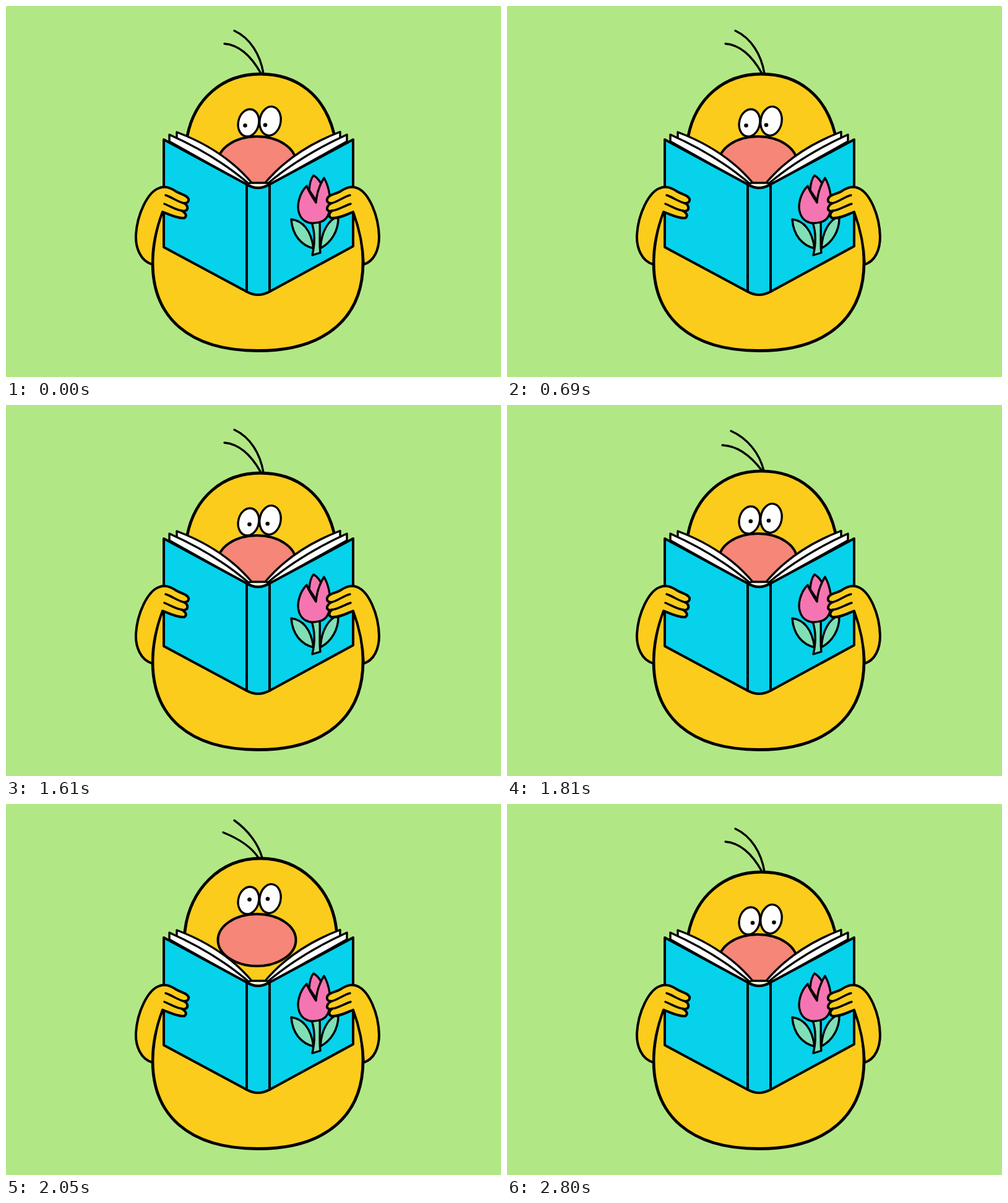
These frames come from a looping animation (800x600 px, 3000 ms). An HTML page:

```html
<!DOCTYPE html>
<html lang="en">
<head>
<meta charset="utf-8">
<title>Reading bird</title>
<style>
  html, body { margin: 0; width: 100%; height: 100%; overflow: hidden; background: #b2e786; }
  svg { display: block; width: 800px; height: 600px; }
  .ink { stroke: #000; stroke-width: 4; stroke-linecap: round; stroke-linejoin: round; fill: none; }
  .skin { fill: #fbcc1c; }
  .beak { fill: #f58678; }
  .white { fill: #fff; }
  .cream { fill: #fff9dc; }
  .cover { fill: #06d2ec; }
  .petal { fill: #f575b2; }
  .leaf { fill: #80dfb6; }
  .thin { stroke-width: 3.4; }
  .bold { stroke-width: 4.8; }
</style>
</head>
<body>
<svg viewBox="0 0 800 600">
  <g class="ink">
    <path id="hair" class="thin"/>
    <path id="body" class="skin bold"/>

    <g id="face">
      <ellipse class="beak" cx="405.5" cy="253" rx="63" ry="42"/>
      <ellipse class="white thin" cx="392" cy="189" rx="16.6" ry="22.3" transform="rotate(13 392 189)"/>
      <ellipse class="white thin" cx="427" cy="186" rx="17" ry="23.5" transform="rotate(10 427 186)"/>
    </g>
    <g fill="#000" stroke="none">
      <circle id="pupilL" r="3.3"/>
      <circle id="pupilR" r="3.3"/>
    </g>

    <g class="thin">
      <path class="white" d="M276 222V204Q353 233 398 287L389 289Z"/>
      <path class="white" d="M264 219V208Q340 242 393 288L389 289Z"/>
      <path class="white" d="M540 222V203.500Q463 233 418 287L426 289Z"/>
      <path class="white" d="M551 219V208Q476 242 422 288L426 289Z"/>
    </g>
    <path class="cover" d="M255 216L389 288.500Q407 300 426 288.500L561 216V388.500L426 462Q407 472 389 462L255 390Z"/>
    <path class="cream thin" d="M390 288.500L395 286H421L425 288.500Q407 299 390 288.500Z"/>
    <path d="M389 289V462M426 289V462"/>

    <g class="thin">
      <path class="leaf" d="M461 345C479 347 493 362 497 392C477 387 463 371 461 345Z"/>
      <path class="leaf" d="M537 340C521 346 510 364 508 392C525 383 538 364 537 340Z"/>
      <path class="leaf" d="M494 350C500 368 499 386 495 403L508 399C506 384 508 366 507 349Z"/>
      <path class="petal" d="M490 298Q491 281 497 274Q504 278 509 287L502 316Z"/>
      <path class="petal" d="M486 291C474 303 469 323 474 336C478 347 488 352 498 351C512 350 519 345 522 334C526 315 523 294 514 278C507 289 502 304 501 318C495 309 489 300 486 291Z"/>
    </g>

    <path class="skin" d="M237 418C217 413 209 390 210 370C212 336 229 302 246 295C257 290 266 294 275 300C284 305 293 306 295 312C296 317 292 319 288 319C294 322 295 329 290 331C288 332 286 332 284 331C291 335 293 340 288 343C277 344 264 337 253 333C243 360 236 390 237 418Z"/>
    <path class="thin" d="M258 306C268 309 278 317 288 319M256 320C266 324 275 330 284 331"/>
    <path class="skin" d="M578 418C595 413 603 394 603 373C602 337 586 303 569 295C558 290 549 294 540 300C531 305 521 305 519 312C518 317 521 319 526 319C519 322 517 329 521 331C523 332 525 332 527 331C521 335 521 341 526 343C538 344 551 337 561 333C571 360 577 388 578 418Z"/>
    <path class="thin" d="M556 306C546 308 536 317 526 319M557 320C547 323 537 330 527 331"/>
  </g>
</svg>
<script>
  const LOOP = 3000;
  const el = id => document.getElementById(id);
  const mix = (a, b, k) => +(a + (b - a) * k).toFixed(2);

  const hairs = {
    rest: "M353 61C378 63 398 84 412 109M369 40C395 52 411 79 416 109",
    drag: "M348 65C374 66 396 85 412 106M362 42C389 54 408 78 415 106",
    high: "M351 46C376 56 397 70 408 87M369 26.500C392 43 408 65 414 87",
    peak: "M351 43C376 53 397 67 408 84M369 23.500C392 40 408 62 414 84"
  };

  // rise: how far the head is stretched; shift: offset of the face; eyes: x, y of both pupils
  const low = eyes => ({ rise: 0, shift: 0, hair: "rest", eyes });
  const left = low([386.5, 193.3, 419, 192.5]);
  const mid = low([393.5, 193, 422.7, 192]);
  const right = low([397, 192.3, 431.5, 191.5]);
  const start = { rise: 0.14, shift: -3, hair: "drag", eyes: [393.8, 188, 423, 187] };
  const peak = { rise: 1.14, shift: -36, hair: "peak", eyes: [393.5, 151.5, 423, 150.5] };
  const up = { rise: 1, shift: -33, hair: "high", eyes: [393.5, 154.5, 423, 153.5] };

  const steps = [
    [0, left], [230, mid], [460, right],
    [690, left], [920, mid], [1150, right],
    [1380, left], [1610, mid],
    [1810, start], [1930, peak], [2050, up],
    [2650, start], [2800, right]
  ];

  function bodyPath(k) {
    const top = 110 - 22 * k;
    const lx = mix(293, 289.5, k), ly = mix(210, 203, k);
    const rx = mix(530, 534, k), ry = mix(206, 203, k);
    return `M${lx} ${ly}C${mix(305, 297, k)} ${mix(150, 140, k)} ${mix(350, 345, k)} ${top} 411 ${top}` +
      `C${mix(472, 475, k)} ${top} ${mix(515, 526, k)} ${mix(146, 135, k)} ${rx} ${ry}` +
      `C538 250 577 340 577 415C577 501 520 557.5 407 557.5C295 557.5 237 503 237 415C237 340 285 250 ${lx} ${ly}Z`;
  }

  function place(id, x, y) {
    el(id).setAttribute("cx", x);
    el(id).setAttribute("cy", y);
  }

  let shown;
  function draw(pose) {
    if (pose === shown) return;
    shown = pose;
    const [ax, ay, bx, by] = pose.eyes;
    el("body").setAttribute("d", bodyPath(pose.rise));
    el("hair").setAttribute("d", hairs[pose.hair]);
    el("face").setAttribute("transform", `translate(0 ${pose.shift})`);
    place("pupilL", ax, ay);
    place("pupilR", bx, by);
  }

  const origin = performance.now();
  function tick() {
    const t = (performance.now() - origin) % LOOP;
    draw(steps.filter(([at]) => at <= t).pop()[1]);
    requestAnimationFrame(tick);
  }
  tick();
</script>
</body>
</html>
```
